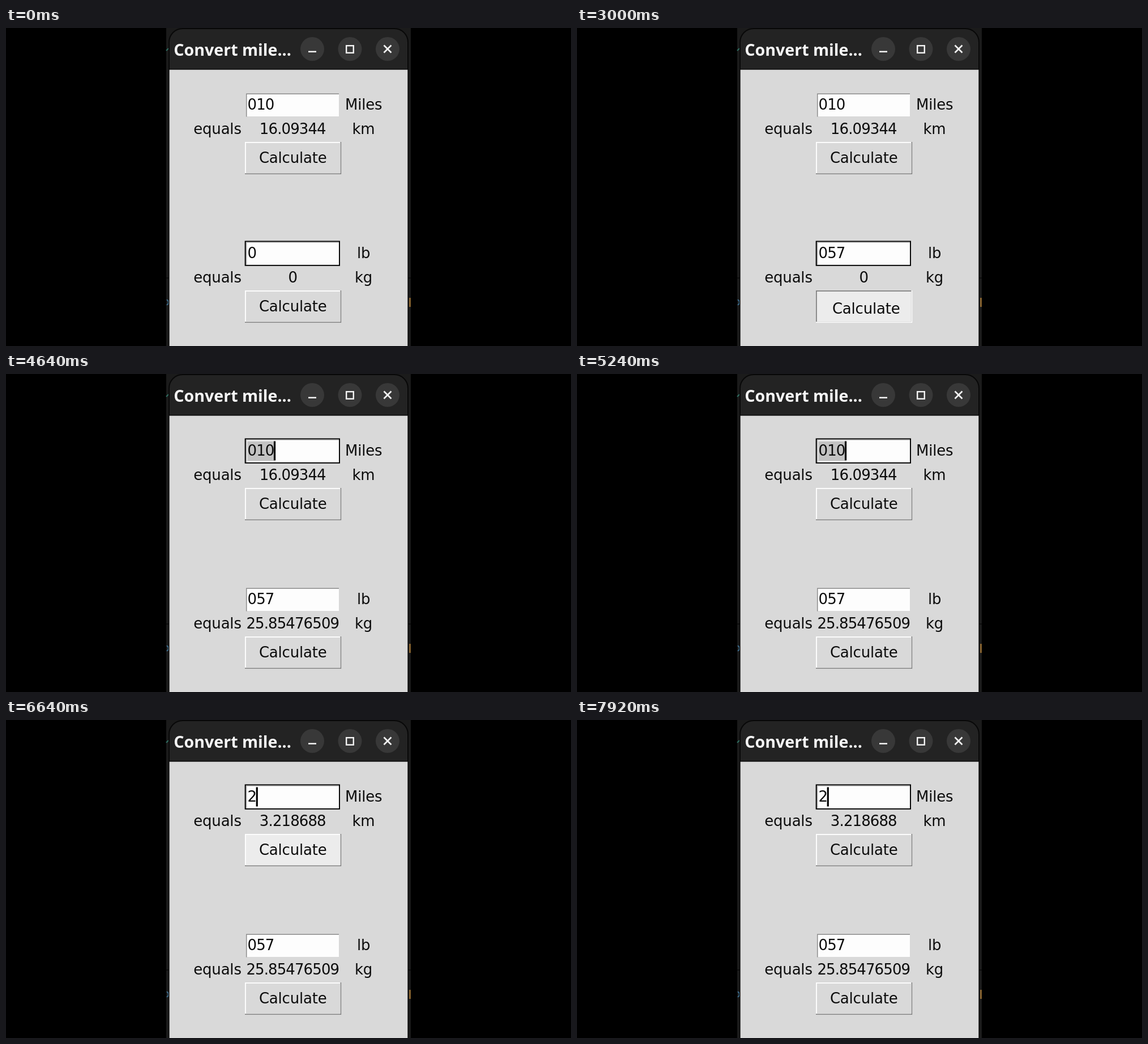
An HTML page with a canvas that plays this animation: 998x561 px, repeating every 8440 ms.

```html
<!DOCTYPE html>
<html lang="en">
<head>
<meta charset="utf-8">
<title>Unit converter</title>
<style>
html, body { margin: 0; width: 100%; height: 100%; overflow: hidden; background: #000; }
canvas { display: block; }
</style>
</head>
<body>
<canvas width="998" height="561"></canvas>
<script>
const ctx = document.querySelector('canvas').getContext('2d');
const LOOP = 8440;
const FACE = '#d9d9d9', ACTIVE = '#ececec', INK = '#0c0c0c', SHADE = '#828282';
const WORD = { font: '26px "DejaVu Sans", sans-serif', spacing: '-0.2px' };
const NUMBER = { font: '26px "DejaVu Sans", sans-serif', spacing: '-0.9px' };
const TITLE = { font: 'bold 28.6px "Noto Sans", sans-serif', spacing: '0px' };
const DIGIT = 15.65;

// Each entry: start time and the state it changes.
const steps = [
  [0, { focus: 1, caret: 0, selected: 0, miles: '010', km: '16.09344', lb: '0', kg: '0', top: '', low: '' }],
  [400, { caret: 1 }],
  [680, { lb: '05' }],
  [1240, { caret: 0 }],
  [1360, { caret: 1, lb: '057' }],
  [1840, { caret: 0 }],
  [2200, { caret: 1 }],
  [2520, { low: 'hover' }],
  [2800, { low: 'press' }],
  [3000, { caret: 0 }],
  [3040, { low: 'hover', kg: '25.85476509' }],
  [3120, { low: '' }],
  [3400, { caret: 1 }],
  [4000, { caret: 0, top: 'hover' }],
  [4160, { top: '' }],
  [4240, { focus: 0, caret: 1 }],
  [4640, { selected: 1 }],
  [4800, { caret: 0 }],
  [5240, { caret: 1 }],
  [5520, { selected: 0, miles: '2' }],
  [5880, { caret: 0 }],
  [6120, { caret: 1 }],
  [6360, { top: 'hover' }],
  [6440, { top: 'press' }],
  [6640, { top: 'hover', km: '3.218688' }],
  [6720, { top: '' }],
  [6880, { caret: 0 }],
  [7040, { caret: 1 }],
  [7840, { caret: 0 }],
  [7920, { caret: 1 }]
];

function rect(x, y, w, h, color) {
  ctx.fillStyle = color;
  ctx.fillRect(x, y, w, h);
}

function text(str, x, y, style = WORD, align = 'center', color = INK) {
  ctx.font = style.font;
  ctx.letterSpacing = style.spacing;
  ctx.textAlign = align;
  ctx.fillStyle = color;
  ctx.fillText(str, x, y);
}

function line(color, width, ...points) {
  ctx.strokeStyle = color;
  ctx.lineWidth = width;
  ctx.beginPath();
  points.forEach(([x, y], i) => i ? ctx.lineTo(x, y) : ctx.moveTo(x, y));
  ctx.stroke();
}

function drawWindow() {
  rect(0, 0, 998, 561, '#000');
  rect(283, 0, 432, 561, '#1b1b1b');
  rect(283, 440, 432, 2, '#0c0c0c');
  line('#2f6f62', 2, [283, 40], [287, 36]);
  ctx.strokeStyle = '#3d6f91';
  ctx.lineWidth = 2;
  ctx.beginPath();
  ctx.arc(282, 484, 5, -1.2, 1.2);
  ctx.stroke();
  rect(712, 476, 3, 16, '#86622f');

  ctx.beginPath();
  ctx.roundRect(288, 1, 422, 580, 24);
  ctx.fillStyle = '#232323';
  ctx.fill();
  ctx.strokeStyle = '#080808';
  ctx.lineWidth = 2;
  ctx.stroke();
  rect(289, 72, 420, 2, '#0a0a0a');
  rect(288.6, 73.6, 420.8, 488, FACE);

  text('Convert mile...', 296.3, 48.5, TITLE, 'left', '#f7f7f7');
  for (const x of [541, 607.5, 674]) {
    ctx.beginPath();
    ctx.arc(x, 37, 21, 0, 7);
    ctx.fillStyle = '#383838';
    ctx.fill();
  }
  const white = '#f4f4f4';
  rect(534, 40.5, 14, 2.5, white);
  ctx.strokeStyle = white;
  ctx.lineWidth = 2.4;
  ctx.strokeRect(601.2, 31.2, 12.6, 12.6);
  line(white, 2.6, [667.5, 30.5], [680.5, 43.5]);
  line(white, 2.6, [680.5, 30.5], [667.5, 43.5]);
}

function drawEntry(y, value, focused, caret, selected) {
  if (focused) rect(421.7, y, 168.3, 44.3, '#000');
  rect(423.7, y + 2, 164.4, 40.4, focused ? '#d0d0d0' : FACE);
  rect(424, y + 2, 164, 41 - focused, focused ? '#bcbcbc' : '#8c8c8c');
  rect(425.5, y + 3.5, 162.5, 39.5 - focused, '#fdfdfd');
  const end = 426.5 + DIGIT * value.length;
  if (selected) rect(426.5, y + 5, end - 426.5, 35, '#c3c3c3');
  text(value, 426.5, y + 30.6, NUMBER, 'left');
  if (caret) rect(end - 0.5, y + 5, 3.2, 34, '#000');
}

function drawButton(y, mode) {
  const down = mode === 'press';
  const [lit, dark] = down ? [SHADE, '#fff'] : ['#fff', SHADE];
  rect(422, y, 170.2, 57, dark);
  rect(422, y, 168.5, 55.3, lit);
  rect(423.8, y + 1.8, 166.7, 53.5, mode ? ACTIVE : FACE);
  const shift = down ? 4 : 0;
  text('Calculate', 506.7 + shift, y + 37 + shift);
}

function drawConverter(y, input, output, from, to, mode, focused, state) {
  drawEntry(y, input, focused, focused && state.caret, focused && state.selected);
  text(from, 631.7, y + 30.5);
  text('equals', 373.5, y + 73.3);
  text(output, 506.3, y + 73.3, NUMBER);
  text(to, 631.5, y + 73.3);
  drawButton(y + 87.5, mode);
}

function frame(now) {
  const time = now % LOOP;
  const s = {};
  for (const [start, change] of steps) if (start <= time) Object.assign(s, change);
  drawWindow();
  drawConverter(113.5, s.miles, s.km, 'Miles', 'km', s.top, s.focus === 0, s);
  drawConverter(375.5, s.lb, s.kg, 'lb', 'kg', s.low, s.focus === 1, s);
  requestAnimationFrame(frame);
}
frame(0);
</script>
</body>
</html>
```
